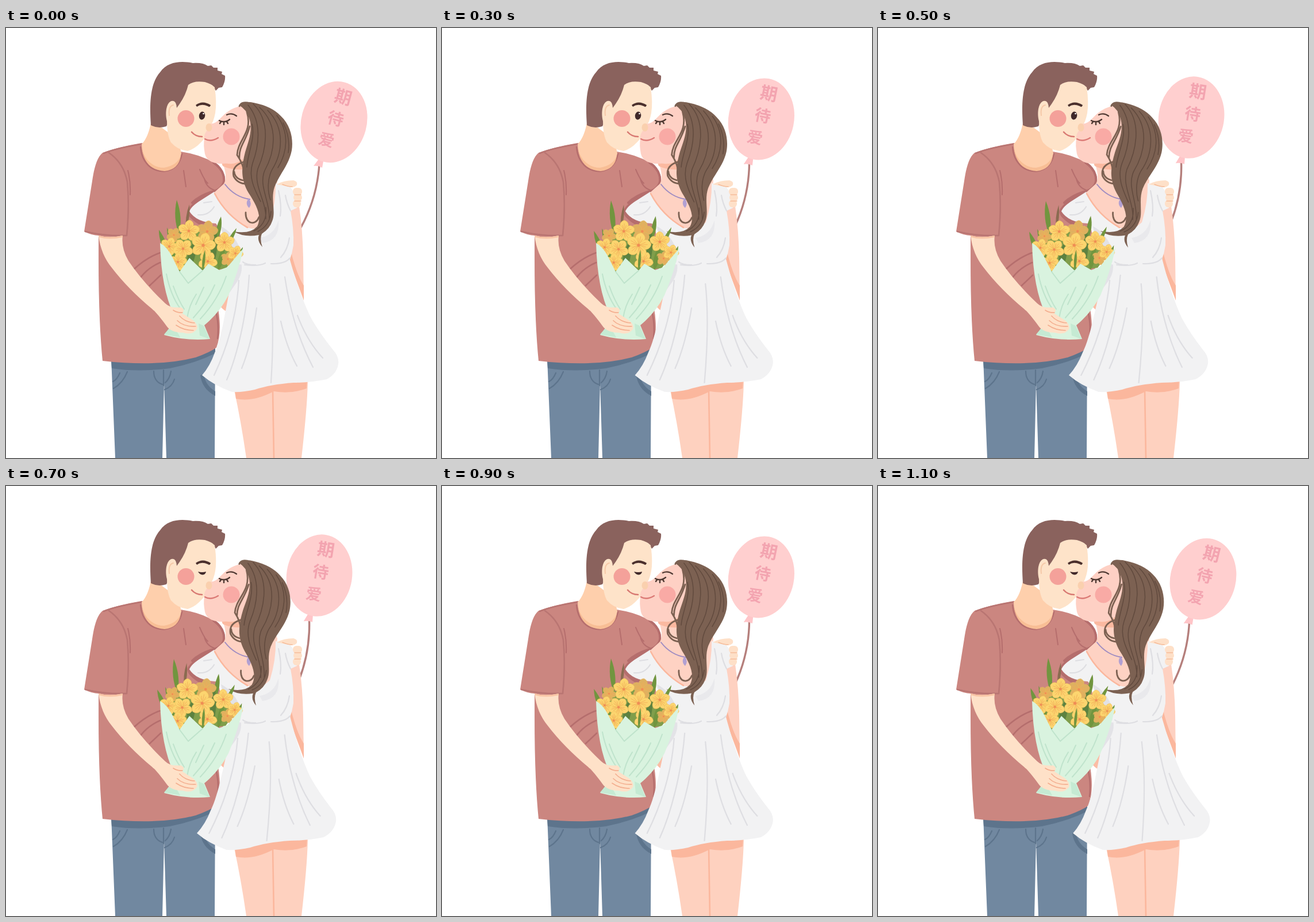
An HTML page for the animation above (1200 ms loop, 748 px wide and 748 px high).

```html
<!DOCTYPE html>
<html lang="zh">
<head>
<meta charset="utf-8">
<title>期待爱</title>
<style>
html, body { margin: 0; width: 100%; height: 100%; overflow: hidden; background: #fff }
svg { display: block; width: 100vw; height: 100vh }
.line { fill: none; stroke-linecap: round; stroke-linejoin: round }
text { font-family: "Noto Sans CJK SC", "Noto Sans CJK", sans-serif; font-weight: 700; text-anchor: middle; dominant-baseline: central }
</style>
</head>
<body>
<svg viewBox="0 0 748 748">
<g id="balloon">
  <path class="line" stroke="#b57f7c" stroke-width="3.4" d="M545 238C542 279 530 316 513 347L492 372"/>
  <path fill="#ffc5c8" d="M544 228L535 240Q543 239 550 243L552 232Z"/>
  <ellipse fill="#ffcfcf" cx="570.5" cy="163.500" rx="57" ry="71.500" transform="rotate(15 570.5 163.500)"/>
  <g fill="#f3a4b0">
    <text font-size="30" transform="translate(587 118) rotate(15)">期</text>
    <text font-size="28" transform="translate(574 156) rotate(15)">待</text>
    <text font-size="27" transform="translate(558 193) rotate(15)">爱</text>
  </g>
</g>

<g id="jeans">
  <path fill="#7188a0" d="M183 574L364 550L363 748H279L275 618L272 748H190Z"/>
  <path fill="#5d748c" d="M183 578Q280 584 364 554V566Q330 583 285 592Q230 599 184 592Z"/>
  <path fill="#5d748c" d="M338 604Q341 628 364 640V632Q347 622 344 602Z"/>
  <g class="line" stroke="#5d748c" stroke-width="2.2">
    <path d="M187 627Q203 618 211 598M186 615Q193 612 198 600M257 597Q257 615 272 620M274 595V622M276 629Q289 624 293 611M277 617Q285 610 287 597"/>
  </g>
</g>

<g id="shirt">
  <path fill="#cb8680" d="M236 200Q195 207 168 217C158 225 153 245 150 266L136 354Q150 361 161 361V400Q161 510 168 579Q265 590 330 573Q355 564 366 556Q376 530 369 488L380 400L360 290Q381 280 381 262Q379 243 361 234Q338 220 304 215Z"/>
  <g class="line" stroke="#b56e6d" stroke-width="3">
    <path d="M235 202Q188 210 170 218M179 217Q205 235 211 268Q215 310 210 361M138 354Q170 362 210 361" stroke="#b97572" stroke-width="2.600"/>
    <path d="M234 207C236 235 255 251 277 249Q301 245 306 219" stroke-width="2.400"/>
    <path d="M361 234Q381 248 379 267Q376 281 358 285Q336 292 324 304" stroke-width="4"/>
    <path d="M345 262Q348 277 362 282M337 246Q345 265 351 270M212 248Q217 267 216 290M309 248L313 276" stroke-width="2"/>
    <path d="M222 420Q245 399 268 391M234 434Q247 417 268 408M250 448L269 430M365 492Q371 516 368 540" stroke-width="2.6"/>
  </g>
  <path fill="#b56e6d" d="M360 284Q330 295 316 316Q312 327 336 342L372 335Z"/>
</g>

<g id="man">
  <path fill="#fecfac" d="M253 160Q248 190 236 202C236 228 256 247 274 247Q300 245 305 218L300 195Z"/>
  <path fill="#f8be95" d="M236 206C239 228 255 243 275 243Q298 239 304 222Q301 246 276 249Q240 247 236 206Z"/>
  <path fill="#8a625d" d="M252 169C250 138 249 98 268 77C281 58 305 57 325 61Q343 60 351 66L357 65L361 69L368 69L368 74L376 76L375 80L381 83Q382 93 376 103L370 104L365 109L358 99L326 96L304 132L289 150L279 171Q264 176 252 169Z"/>
  <path fill="#fee3c9" d="M302 132Q313 116 317 99Q327 91 346 94Q357 97 363 103Q367 130 364 148Q361 164 355 171L348 183Q347 192 339 199Q329 210 316 214Q298 212 287 199Q280 187 280 162C276 145 280 129 288 127Q296 125 297 139Z"/>
  <path class="line" stroke="#f5c9a8" stroke-width="2" d="M284 152Q282 136 291 134"/>
  <circle cx="313" cy="157.500" r="14.500" fill="#f4a19a"/>
  <path fill="#4b302d" d="M330 134Q342 125 356 134Q355 139 351 136Q340 131 332 137Z"/>
  <g id="open">
    <ellipse cx="341" cy="152.500" rx="5.200" ry="7" fill="#40292a" transform="rotate(10 341 152.500)"/>
    <circle cx="343.500" cy="149" r="1.300" fill="#fff"/>
  </g>
  <path id="shut" fill="#40292a" d="M334 149Q341 151 348 149Q347 154 342 154.500Q337 154 334 149Z"/>
  <path class="line" stroke="#d87972" stroke-width="2.600" d="M323 181Q330 189 341 189"/>
</g>

<g id="legs">
  <path fill="#fed1bf" d="M397 615H525Q524 660 514 748H418Q409 685 397 630Z"/>
  <path fill="#fbb79d" d="M397 620L524 610L523 627Q496 637 466 632Q430 651 400 645Z"/>
  <path class="line" stroke="#fbb79d" stroke-width="2.600" d="M464 630L466 748"/>
</g>

<g id="arms">
  <path fill="#fed1c1" d="M490 300L510 310Q516 350 517 400L518 473Q505 435 492 398Z"/>
  <path fill="#fbb79d" d="M496 390Q506 430 518 448V474Q504 436 493 406Z"/>
  <path fill="#fbbda5" d="M388 450L372 478Q371 486 383 493L394 470Z"/>
</g>

<g id="girl">
  <path fill="#fed2c3" d="M374 228Q387 257 379 271L360 288Q384 338 422 354L466 340L472 265L440 190Z"/>
  <path fill="#fbb9a0" d="M374 232Q395 242 412 228V246Q390 247 377 240Z"/>
  <path fill="#fed0c4" d="M412 135Q391 138 375 155Q363 169 353 166Q346 171 350 178Q344 184 345 193Q343 203 346 219Q350 234 371 236Q397 237 413 227L433 180L426 140Z"/>
  <ellipse cx="353" cy="173" rx="5.500" ry="7" fill="#fad0ae"/>
  <circle cx="392" cy="189" r="14.500" fill="#f9aaa5"/>
  <g class="line" stroke="#4e3932">
    <path stroke-width="2.200" d="M384 151Q393 147 401 153"/>
    <path stroke-width="2.400" d="M371 161Q381 166 389 159M374 163L372 166M379 164L379 168M384 163L386 166"/>
  </g>
  <path class="line" stroke="#db7a76" stroke-width="2.400" d="M346 193Q356 199 369 191"/>
  <path class="line" stroke="#9f8cc2" stroke-width="2" d="M381 272Q398 294 424 298"/>
  <path fill="#b2a0d2" d="M422 296Q429 305 423 313Q415 306 422 296Z"/>
</g>

<g id="skirt">
  <path fill="#f2f2f3" d="M404 400H493C502 432 517 478 531 505Q545 530 569 560Q580 572 578 585Q575 602 558 611Q530 617 500 617Q460 620 433 629Q412 634 393 633Q362 622 341 604Q355 588 363 565C381 525 384 455 404 400Z"/>
  <path fill="#e3e3e7" d="M408 403Q414 422 403 440L387 463L393 422Z"/>
  <g class="line" stroke="#dedee2" stroke-width="2.200">
    <path d="M405 439C402 500 383 560 362 604M423 430C419 500 402 570 384 612M436 487C430 530 421 565 410 592M459 445C466 500 464 570 461 617M485 433C495 500 513 550 534 590M507 500Q524 545 551 574M478 510Q488 555 506 588"/>
  </g>
</g>

<g id="bodice">
  <path fill="#f2f2f3" d="M362 285Q382 326 418 347Q443 354 459 338Q470 302 469 270L493 274Q505 289 506 313L495 318Q501 350 500 378Q498 392 493 405Q449 418 405 411L380 361L365 340Q331 338 319 319Q322 310 340 299Z"/>
  <path class="line" stroke="#fbb79d" stroke-width="2.600" d="M363 288Q383 326 420 347"/>
  <path fill="#e2e2e6" d="M374 345Q398 357 410 391L407 408L386 392Z"/>
  <path fill="#e9e9ec" d="M441 365Q467 361 474 334Q477 370 446 374Z"/>
  <g class="line" stroke="#dedee2" stroke-width="2.200">
    <path d="M415 412Q440 415 451 409M412 407Q417 412 434 412M461 410Q485 411 494 400M495 318Q488 304 486 291M474 283Q480 310 477 327M493 365Q490 386 478 399M334 325Q352 327 362 311M344 304L358 302"/>
  </g>
</g>

<g id="shoulderHand" fill="#fee0c8">
  <path d="M471 272Q483 265 500 265Q508 267 506 273Q501 279 492 276Z"/>
  <rect x="499" y="278" width="16" height="13" rx="6"/>
  <rect x="500" y="289" width="15" height="12" rx="6"/>
  <rect x="499" y="299" width="14" height="13" rx="6"/>
  <path class="line" stroke="#f6bd9b" stroke-width="1.600" d="M502 290H513M502 301H513M481 272Q490 276 498 276"/>
</g>

<g id="hair">
  <path fill="#7c6152" d="M405 134Q415 126 431 130Q462 136 478 153C496 170 500 194 497 213C492 239 475 255 467 277C460 298 470 320 463 336Q459 349 445 358Q441 367 446 381Q436 370 440 360Q415 365 396 354Q425 359 437 345C446 327 435 307 422 287C407 262 410 240 416 216C422 196 430 177 423 157Q419 142 405 134Z"/>
  <g class="line" stroke="#7c6152" stroke-width="2.800">
    <path d="M406 136Q409 128 420 130M419 146C430 182 403 194 402 221Q415 239 416 264M424 171C417 198 405 205 406 226M413 233Q392 240 396 258Q403 271 418 271M397 250Q398 262 412 265M417 321C416 342 435 344 440 329"/>
  </g>
  <g class="line" stroke="#614a3e" stroke-width="1.500">
    <path d="M421 134C446 164 440 205 429 235C421 260 433 282 443 302M430 132C463 164 451 216 438 245C430 275 453 300 452 332M441 138C476 170 467 217 450 248C439 274 459 301 458 331M455 143C487 175 480 219 463 246C454 263 455 284 460 299M471 152C494 182 489 217 473 243M428 167C434 193 420 219 419 242M452 312Q455 341 431 353M461 319Q459 344 438 354M482 165Q495 190 491 217"/>
  </g>
</g>

<g id="flowers"></g>

<g id="wrap">
  <path fill="#d9f3df" d="M268 374Q279 380 288 396L302 424L319 400L342 422L352 410L371 421L385 416L413 383Q404 425 387 465Q371 496 345 517L355 541Q315 545 275 534Q291 516 292 499Q270 454 268 374Z"/>
  <g class="line" stroke="#bfe3cc" stroke-width="2">
    <path d="M302 424L317 444L342 422M279 428Q286 464 303 488M291 449Q300 474 310 489M331 463Q318 483 315 505M363 447Q350 478 326 504M383 432Q369 473 338 506M344 451L330 481"/>
  </g>
  <path fill="#c5ead3" d="M335 514L344 518L354 541L337 535ZM275 533L290 515L303 538Z"/>
</g>

<g id="arm">
  <path fill="#fee1c8" d="M161 361Q180 366 203 361Q200 383 213 405Q237 441 277 479Q286 488 304 486Q313 490 306 496L326 509Q335 517 332 524Q324 535 308 530Q287 530 279 518Q269 504 258 492Q213 455 184 417Q165 394 161 361Z"/>
  <path fill="#f9c5a5" d="M161 361Q180 366 203 361V364Q180 369 162 364Z"/>
  <g class="line" stroke="#f4af90" stroke-width="1.700">
    <path d="M302 501Q312 512 328 513M298 509Q309 520 330 519M296 517Q309 526 326 526M291 491Q299 496 307 495"/>
  </g>
</g>
</svg>
<script>
const el = id => document.getElementById(id);

// Leaf blade from its tip to its base, w wide.
const leaf = ([tx, ty, bx, by, w, color = '#71953f']) => {
  const mx = (tx + bx) / 2, my = (ty + by) / 2;
  return `<path fill="${color}" d="M${tx} ${ty}Q${mx + w} ${my} ${bx} ${by}Q${mx - w} ${my} ${tx} ${ty}"/>`;
};

const flower = ([x, y, r, turn, color = '#fcd56f']) => {
  let out = '';
  for (let i = 0; i < 5; i++) {
    out += `<g transform="rotate(${turn + i * 72})">
      <path fill="${color}" stroke="#efbb5a" stroke-width=".5" d="M0 0C${-r * .6} ${-r * .45} ${-r * .4} ${-r * .9} 0 ${-r}C${r * .4} ${-r * .9} ${r * .6} ${-r * .45} 0 0"/>
      <path class="line" stroke="#f2ab58" stroke-width=".8" d="M0 0V${-r * .7}M0 0L${-r * .18} ${-r * .55}M0 0L${r * .18} ${-r * .55}"/></g>`;
  }
  return `<g transform="translate(${x} ${y})">${out}<circle r="${r * .12}" fill="#f08d55"/></g>`;
};

const leaves = [
  [297, 299, 301, 360, 9], [319, 307, 313, 350, 5, '#8a6b50'], [266, 351, 283, 399, 9],
  [374, 328, 366, 372, 8], [401, 348, 383, 381, 7], [412, 381, 394, 419, 8],
  [280, 347, 291, 388, 6], [365, 345, 359, 420, 10, '#5c8240'], [327, 372, 318, 420, 13, '#5c8240'],
  [379, 380, 369, 423, 10], [285, 382, 299, 420, 10]
];
const dark = '#deb160';
const blooms = [
  [350, 354, 19, 10, dark], [292, 360, 13, 30, dark], [386, 402, 13, 15, dark], [318, 353, 19, 5],
  [284, 380, 16, 20], [308, 384, 18, 40], [299, 407, 16, 5], [351, 406, 17, 30],
  [380, 373, 18, 0], [399, 392, 14, 25], [343, 378, 22, 15]
];
el('flowers').innerHTML =
  '<path fill="#809e4b" d="M272 378L300 356L358 352L394 382L399 398L382 419L302 424Z"/>' +
  leaves.map(leaf).join('') + blooms.map(flower).join('') +
  leaf([346, 386, 342, 423, 5]) + leaf([376, 396, 369, 421, 5]);

const move = (id, value) => el(id).setAttribute('transform', value);

function draw(now) {
  const step = Math.floor(now / 100) % 12;
  const sway = 6 - Math.abs(step - 6);
  const skew = .0072 * sway, grow = .0034 * sway;
  move('balloon', `rotate(${-1.2 * sway} 482 402)`);
  move('hair', `rotate(${.5 * sway} 415 130)`);
  move('flowers', `rotate(${-.48 * sway} 340 420)`);
  move('skirt', `matrix(${1 + grow} 0 ${-skew} 1 ${skew * 410 - grow * 460} 0)`);
  el('open').style.display = step < 6 ? '' : 'none';
  el('shut').style.display = step < 6 ? 'none' : '';
}

const start = performance.now();
function tick() {
  draw(performance.now() - start);
  requestAnimationFrame(tick);
}
tick();
</script>
</body>
</html>
```
